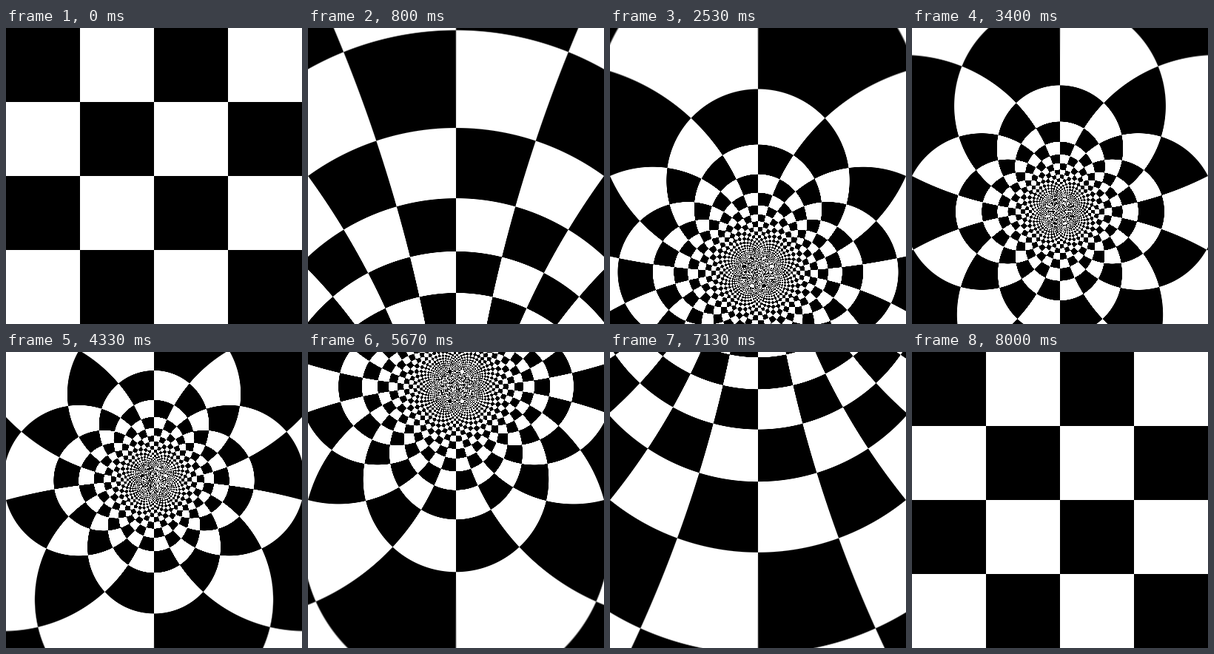
Recreate the animation shown at these times as an HTML page with a canvas. Size 400 by 400 pixels, loop 8.07 s.

```html
<!DOCTYPE html>
<html lang="en">
<head>
<meta charset="utf-8">
<title>Turning checkerboard</title>
<style>
html, body { margin: 0; width: 100%; height: 100%; overflow: hidden; background: #fff; }
canvas { display: block; width: 400px; height: 400px; }
</style>
</head>
<body>
<canvas id="stage" width="400" height="400"></canvas>
<script>
const SIZE = 400, RADIUS = 2, CELL = 100;
const LOOP = 8070, STEP = 200 / 3, LAST = 120;

const ctx = document.getElementById('stage').getContext('2d');
const picture = ctx.createImageData(SIZE, SIZE);
const pixels = new Uint32Array(picture.data.buffer);

// +1 or -1 by cell parity; the ramp across a grid line is 1/CELL wide,
// so edges only soften where the board is magnified
function wave(u) {
  const cell = Math.floor(u);
  const part = u - cell;
  const edge = Math.min(1, 2 * CELL * Math.min(part, 1 - part));
  return cell % 2 ? -edge : edge;
}

// The plane is wrapped on a sphere that turns about its horizontal axis:
// z = (w cos a + i R sin a) / (cos a + i w sin a / R)
function draw(index) {
  const angle = Math.PI * index / LAST;
  const c = Math.cos(angle), s = Math.sin(angle);
  for (let row = 0, i = 0; row < SIZE; row++) {
    const y = (row + 0.5 - SIZE / 2) / CELL;
    for (let col = 0; col < SIZE; col++, i++) {
      const x = (col + 0.5 - SIZE / 2) / CELL;
      const topX = x * c, topY = y * c + RADIUS * s;
      const lowX = c - y * s / RADIUS, lowY = x * s / RADIUS;
      const norm = lowX * lowX + lowY * lowY;
      const u = (topX * lowX + topY * lowY) / norm;
      const v = (topY * lowX - topX * lowY) / norm;
      const shade = Math.round(127.5 * (1 - wave(u) * wave(v)));
      pixels[i] = 0xff000000 | shade * 0x010101;
    }
  }
  ctx.putImageData(picture, 0, 0);
}

let shown = -1;
function tick() {
  const time = performance.now() % LOOP;
  const index = Math.min(LAST, Math.floor((time + 3.34) / STEP));
  if (index !== shown) draw(shown = index);
  requestAnimationFrame(tick);
}
tick();
</script>
</body>
</html>
```
